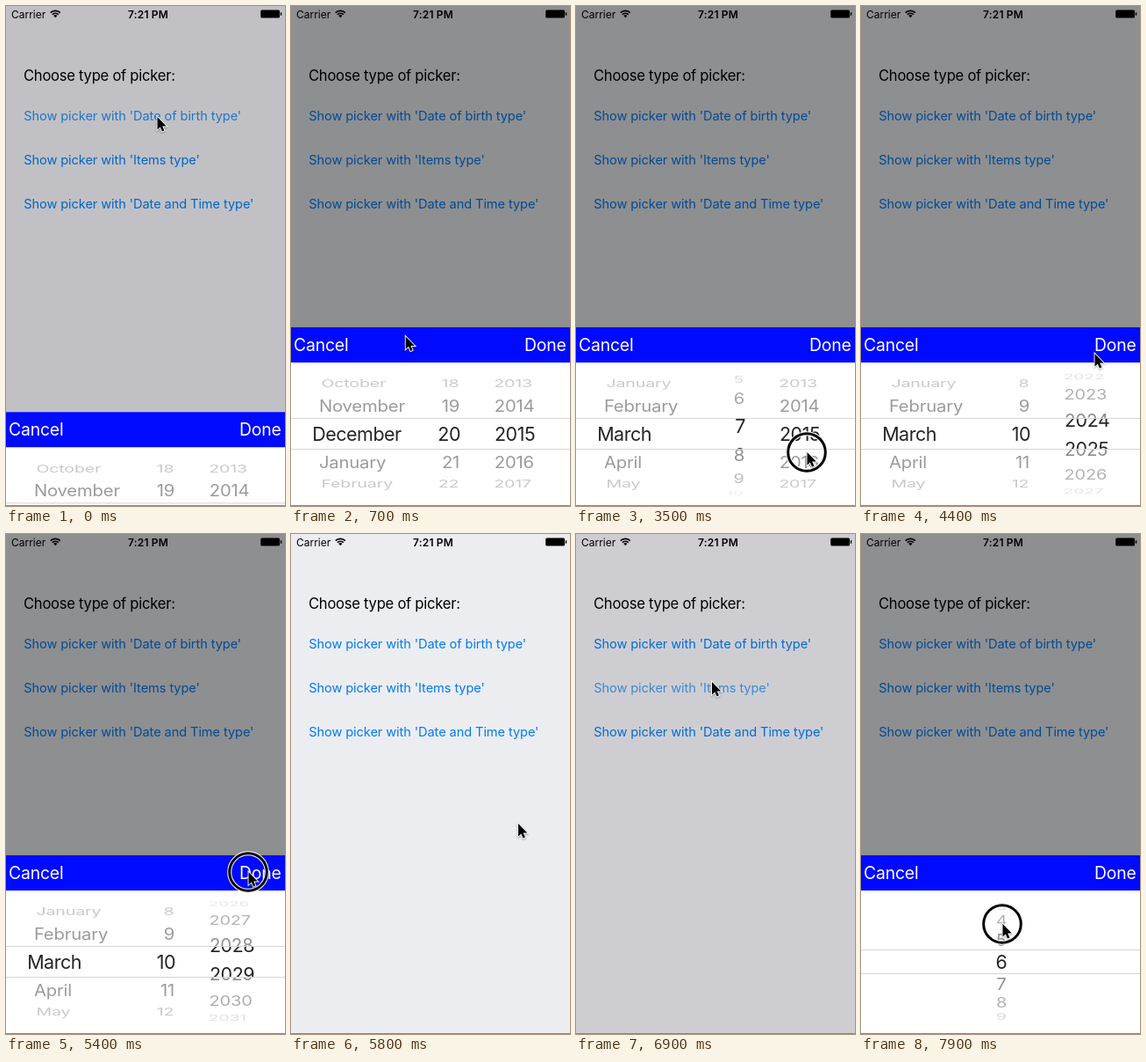
Animation of 318x568 px, one loop 8000 ms. Source, as an HTML page with a canvas:

```html
<!DOCTYPE html>
<html lang="en">
<head>
<meta charset="utf-8">
<title>Picker demo</title>
<style>
html, body { margin: 0; width: 100%; height: 100%; overflow: hidden; background: #ecedf1; }
canvas { display: block; width: 318px; height: 568px; }
</style>
</head>
<body>
<canvas id="stage"></canvas>
<script>
const W = 318, H = 568, LOOP = 8000, TOP = 365, BAR = 40;
const MID = 121, RADIUS = 70.5;           // wheel centre below the panel top, wheel radius
const MONTHS = ['January', 'February', 'March', 'April', 'May', 'June', 'July',
  'August', 'September', 'October', 'November', 'December'];
const LINKS = ['Date of birth', 'Items', 'Date and Time'];
const OPEN = [-151, 6795], CLOSE = 5480, TRAVEL = 600;

const canvas = document.getElementById('stage');
const dpr = window.devicePixelRatio || 1;
canvas.width = W * dpr;
canvas.height = H * dpr;
const c = canvas.getContext('2d');

const clamp = x => Math.max(0, Math.min(1, x));
const smooth = x => x * x * (3 - 2 * x);
const mix = (a, b, u) => a + (b - a) * u;

const hover = (at, x, y) => ({ at, x, y, dx: 0, rise: 0, ms: 0 });
const tap = (at, x, y) => ({ ...hover(at, x, y), ms: 100 });
const swipe = (at, x, y, rise, ms = 250) => ({ at, x, y, dx: 3, rise, ms });

const monthSwipe = swipe(930, 110, 496, 120);
const daySwipe = swipe(2430, 183, 515, 120);
const yearSwipe = swipe(3500, 263, 507, 112);
const itemSwipe = swipe(7530, 158, 545, 102, 370);
const GESTURES = [tap(-220, 172, 126), monthSwipe, daySwipe, yearSwipe,
  tap(5300, 276, 384), hover(6000, 252.5, 310), tap(6640, 154.5, 168), itemSwipe];

const progress = (t, g) => clamp((t - g.at) / (g.ms || 1));
const pressed = (t, g) => g.ms > 0 && t > g.at - 50 && t < g.at + g.ms + 50;

// The pointer follows a gesture, rests, then travels to the next one
function pointerAt(t) {
  const i = GESTURES.findLastIndex(g => g.at <= t);
  const g = GESTURES[i], next = GESTURES[i + 1];
  const u = smooth(progress(t, g));
  const x = g.x + g.dx * u, y = g.y - g.rise * u;
  if (!next) return [x, y];
  const leave = Math.max(g.at + g.ms, next.at - TRAVEL);
  const v = smooth(clamp((t - leave) / (next.at - leave)));
  return [mix(x, next.x, v), mix(y, next.y, v)];
}

// A wheel is pulled along by a swipe, then coasts to its end value
function spin(t, g, from, pull, to, coast) {
  const rest = 1 - clamp((t - g.at - g.ms) / coast);
  return rest < 1 ? mix(to, from + pull, rest ** 3) : from + pull * smooth(progress(t, g));
}

function text(s, x, y, size, color, spacing = 0, weight = 400, align = 'left') {
  c.font = `${weight} ${size}px Inter, "Open Sans", sans-serif`;
  c.letterSpacing = spacing + 'px';
  c.textAlign = align;
  c.fillStyle = color;
  c.fillText(s, x, y);
}

function statusBar() {
  text('Carrier', 6, 13.5, 12, '#000');
  text('7:21 PM', 162, 13.5, 12, '#000', 0.15, 600, 'center');
  c.strokeStyle = '#000';
  c.lineWidth = 1.7;
  for (const r of [7.8, 4.9]) {
    c.beginPath();
    c.arc(56.3, 13.2, r, -2.36, -0.78);
    c.stroke();
  }
  c.beginPath();
  c.moveTo(56.3, 13.2);
  c.arc(56.3, 13.2, 3, -2.36, -0.78);
  c.fill();
  c.beginPath();
  c.roundRect(290.2, 4.4, 21.8, 9.2, 1.5);
  c.fill();
  c.fillRect(312.8, 7.3, 1.4, 3.4);
}

function linkAlpha(s) {
  if (s < -150) return 1;
  return s < 0 ? 0.3 : Math.min(1, 0.45 + s / 400);
}

function page(t) {
  c.fillStyle = '#ecedf1';
  c.fillRect(0, 0, W, H);
  text('Choose type of picker:', 20, 85, 16.6, '#000', -0.26);
  LINKS.forEach((name, i) => {
    c.globalAlpha = i < 2 ? linkAlpha(t - OPEN[i]) : 1;
    text(`Show picker with '${name} type'`, 20.2, 130 + 50 * i, 14.6, '#007bf5', -0.09);
  });
  c.globalAlpha = 1;
}

// Rows on a turning cylinder; the middle band shows them larger and darker
function wheel(value, step, half, label, align, x, greyX, drift) {
  for (const picked of [false, true]) {
    c.save();
    c.beginPath();
    if (picked) c.rect(0, MID - half, W, 2 * half);
    else {
      c.rect(0, BAR, W, MID - half - BAR);
      c.rect(0, MID + half, W, 100);
    }
    c.clip();
    const size = picked ? 21.5 : 20.5;
    for (let n = Math.floor(value) - 4; n <= value + 5; n++) {
      const angle = (n - value) * step, cos = Math.cos(angle);
      if (Math.abs(angle) > 1.4) continue;
      c.save();
      c.translate(picked ? x : greyX + drift * (1 - cos), MID + RADIUS * Math.sin(angle));
      c.scale(picked ? 1 : 1 - 0.1 * (1 - cos), cos);
      text(label(n), 0, size * 0.364, size,
        picked ? '#242424' : `rgba(0,0,0,${0.47 * cos ** 1.5})`, picked ? -0.5 : -0.2, 400, align);
      c.restore();
    }
    c.restore();
  }
}

function panel(t, y, items) {
  c.save();
  c.translate(0, y);
  c.fillStyle = '#fff';
  c.fillRect(0, 0, W, H - TOP + 1);
  c.fillStyle = '#000afe';
  c.fillRect(0, 0, W, BAR);
  text('Cancel', 3, 27, 19.4, '#fff', -0.2);
  text('Done', 313.5, 27, 19.4, '#fff', -0.2, 400, 'right');
  const half = items ? 13.5 : 17.5, step = items ? 0.36 : 0.471;
  if (items) {
    wheel(spin(t, itemSwipe, 1, 5, 6, 1), step, half,
      n => n > 0 ? String(n) : '', 'center', 160, 160, 0);
  } else {
    wheel(spin(t, monthSwipe, 12, 2.7, 15, 500), step, half,
      n => MONTHS[(n + 11) % 12], 'left', 24.2, 31, 8.3);
    wheel(spin(t, daySwipe, 20, 2.7, 41, 1747), step, half,
      n => String((n - 1) % 31 + 1), 'right', 193, 192.4, -2.5);
    wheel(spin(t, yearSwipe, 2015, 2.7, 2029, 2480), step, half,
      String, 'left', 232, 232, -2);
  }
  c.fillStyle = '#d6d6d6';
  for (const side of [-half, half]) c.fillRect(0, MID + side - 0.5, W, 1);
  c.restore();
}

function pointer(t) {
  c.save();
  c.translate(...pointerAt(t));
  if (GESTURES.some(g => pressed(t, g))) {
    for (const [color, width] of [['#fff', 5], ['#000', 3]]) {
      c.strokeStyle = color;
      c.lineWidth = width;
      c.beginPath();
      c.arc(0, 0, 21.3, 0, 7);
      c.stroke();
    }
  }
  c.shadowColor = 'rgba(0,0,0,.35)';
  c.shadowBlur = 2 * dpr;
  c.shadowOffsetY = dpr;
  const arrow = new Path2D('M.5 0V14.5L3.8 11.4L6 16.6L8.4 15.6L6.2 10.6H10.8Z');
  c.lineWidth = 1.8;
  c.strokeStyle = '#fff';
  c.stroke(arrow);
  c.shadowColor = 'transparent';
  c.fillStyle = '#000';
  c.fill(arrow);
  c.restore();
}

function draw(t) {
  c.setTransform(dpr, 0, 0, dpr, 0, 0);
  const items = t >= OPEN[1];
  const s = t - OPEN[items ? 1 : 0];
  let dim = clamp(s / 330);
  let rise = 1 - (1 - clamp((s - 112) / 235)) ** 4;
  if (!items && t > CLOSE) {
    const u = clamp((t - CLOSE) / 320);
    dim = 1 - u;
    rise = 1 - smooth(u);
  }
  page(t);
  c.fillStyle = `rgba(0,0,0,${0.4 * dim})`;
  c.fillRect(0, 0, W, H);
  statusBar();
  if (rise > 0) panel(t, mix(H, TOP, rise), items);
  c.fillStyle = '#858585';
  c.fillRect(0, H - 1, W, 1);
  pointer(t);
}

const start = performance.now();
function tick() {
  draw((performance.now() - start) % LOOP);
  requestAnimationFrame(tick);
}
tick();
</script>
</body>
</html>
```
